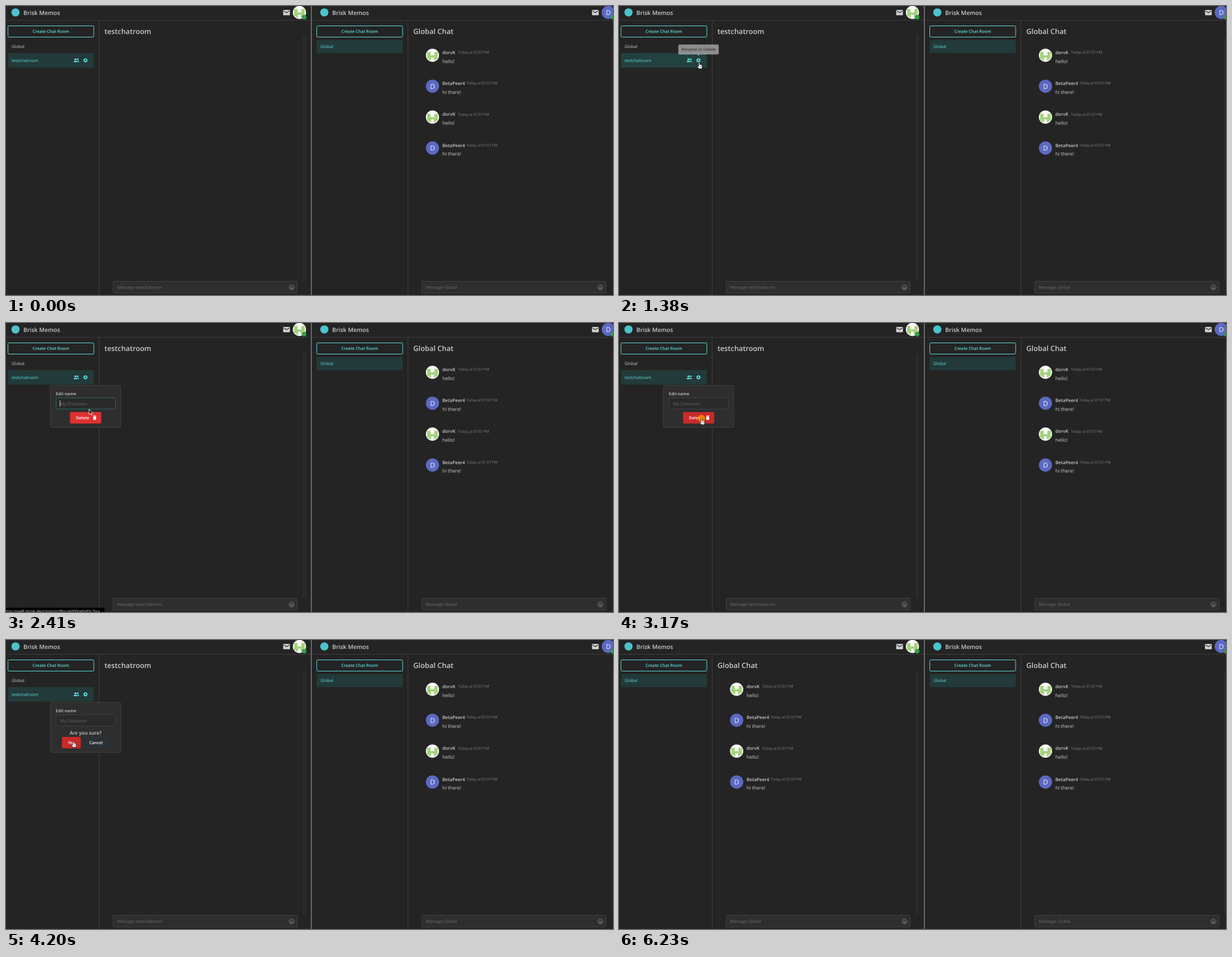
Animation, 1085 px wide and 516 px high, one loop 6630 ms. Source, as an HTML page:

```html
<!DOCTYPE html>
<html lang="en">
<head>
<meta charset="utf-8">
<title>Chat room deletion</title>
<style>
  html, body { margin: 0; width: 100%; height: 100%; overflow: hidden; background: #242424; }
  svg { display: block; width: 1085px; height: 516px; }
  text { font-family: "Open Sans", "Noto Sans", sans-serif; text-rendering: geometricPrecision; white-space: pre; }
  .b { font-weight: 600; }
</style>
</head>
<body>
<svg id="stage" viewBox="0 0 1085 516" xmlns="http://www.w3.org/2000/svg"></svg>
<script>
const LOOP = 6630, TICK = 69;
const TEAL = '#5fdedb', LIGHT = '#cbcbcb', RED = '#e03131', DARK_RED = '#c92a2a';

const text = (x, y, size, fill, str, bold, extra = '') =>
  `<text x="${x}" y="${y}" font-size="${size}" fill="${fill}" ${bold ? 'class="b"' : ''} ${extra}>${str}</text>`;
const rect = (x, y, w, h, fill, extra = '') =>
  `<rect x="${x}" y="${y}" width="${w}" height="${h}" fill="${fill}" ${extra}/>`;
const group = (id, body, extra = '') => `<g id="${id}" ${extra}>${body}</g>`;
const mid = 'text-anchor="middle"';

// Avatars
const blocks = (x, y) => `<g transform="translate(${x} ${y})">
  <circle r="11.8" fill="#f8f9f6"/>
  <path d="M-9.5 -6H-3.5V0H3.5V-6H9.5V6.5H6V9H2.5V4H-2.5V9H-6V6.5H-9.5Z" fill="#a4d27c"/></g>`;
const letter = (x, y) => `<circle cx="${x}" cy="${y}" r="11.8" fill="#5c69c1"/>` +
  text(x, y + 4.3, 12, '#f4f5ff', 'D', false, mid);

// Small icons
const mail = `<rect x="495.5" y="7" width="12" height="9.6" rx="1" fill="#d2d2d2"/>
  <path d="M496.6 8.7L501.5 12L506.4 8.7" fill="none" stroke="#242424" stroke-width="1.2"/>`;
const smile = `<g fill="none" stroke="#929292" stroke-width=".8"><circle cx="510.5" cy="502.5" r="4.5"/>
  <path d="M508 503.6Q510.5 506.6 513 503.6Z"/></g>
  <circle cx="509" cy="501.2" r=".7" fill="#929292"/><circle cx="512" cy="501.2" r=".7" fill="#929292"/>`;
const people = `<g fill="${TEAL}"><circle cx="124" cy="95.2" r="1.8"/><circle cx="128" cy="95.2" r="1.6"/>
  <path d="M121 100.2V99Q121 97.7 124 97.7T127 99V100.2Z"/><path d="M127.8 100.2V98.8L127.2 97.7Q130.4 97.7 130.4 99V100.2Z"/></g>`;
const gear = `<circle cx="142" cy="97" r="2.3" fill="none" stroke="${TEAL}" stroke-width="1.7"/>
  <circle cx="142" cy="97" r="3.3" fill="none" stroke="${TEAL}" stroke-width="1.1" stroke-dasharray="1.7 1.756"/>`;
const trash = `<path d="M155.5 165.6H157.4L158 165H159.2L159.8 165.6H161.6V166.6H155.5ZM156 167.2H161.1V172.2Q161.1 173 160.3 173H156.8Q156 173 156 172.2Z" fill="#fff"/>`;

const messages = () => [0, 1, 2, 3].map(i => {
  const y = 88 + i * 55.2, odd = i % 2;
  return (odd ? letter : blocks)(210.3, y) +
    text(228, y - 2, 8.15, LIGHT, odd ? 'BetaPeer4' : 'dorvK', true) +
    text(odd ? 271 : 256, y - 2.8, 6.55, '#858585', 'Today at 07:07 PM') +
    text(228, y + 13.6, 8.6, '#d0d0d0', odd ? 'hi there!' : 'hello!');
}).join('');

const globalView = () => rect(3.5, 60.7, 153.5, 23.3, '#223a39') +
  text(10, 75.2, 7.65, TEAL, 'Global') +
  text(176, 49.8, 12.85, LIGHT, 'Global Chat', true) +
  messages() + text(198.3, 504.5, 7.65, '#6d6d6d', 'Message Global');

const roomView = () => text(10, 75.2, 7.65, LIGHT, 'Global') +
  rect(3.5, 84, 153.5, 26, '#223a39', 'id="row"') +
  text(10, 100.2, 7.65, TEAL, 'testchatroom') + people + gear +
  text(176, 49.8, 12.75, LIGHT, 'testchatroom', true) +
  text(198.3, 504.5, 7.65, '#6d6d6d', 'Message testchatroom');

const panel = (dx, avatar, body) => `<g transform="translate(${dx} 0)">
  <path d="M-6 25.5H546M166.5 25.5V516" stroke="#3e3e3e" fill="none"/>
  <circle cx="17" cy="11.5" r="7.3" fill="#4cc3cc"/>
  ${text(31, 15.7, 10.5, LIGHT, 'Brisk Memos', true)}
  ${mail}${avatar(524.5, 11.5)}<circle cx="533" cy="20" r="4" fill="#2f9e44"/>
  ${rect(3.5, 35.5, 153.5, 20, 'none', `rx="2" stroke="${TEAL}"`)}
  ${text(80.2, 48.2, 7.5, TEAL, 'Create Chat Room', true, mid)}
  ${rect(530, 54, 6, 437, '#2b2b2b', 'rx="3"')}
  ${rect(191.5, 491.5, 329, 21, '#2e2e2e', 'rx="2" stroke="#424242"')}
  ${smile}${body}</g>`;

const popover = rect(79.5, 111.5, 125.5, 75, '#2e2e2e', 'id="box" rx="2" stroke="#414141"') +
  text(89, 129, 7.5, LIGHT, 'Edit name', true) +
  rect(89.5, 133.5, 106, 20, '#2a2a2a', 'id="field" rx="2"') +
  text(96.3, 146.5, 7.65, '#686868', 'My Chatroom') +
  rect(96, 138, 1, 11, '#c8c8c8', 'id="caret"') +
  group('ask', rect(114.5, 159, 55.8, 20.6, RED, 'id="del" rx="2"') +
    text(125, 172.1, 7.5, '#fff', 'Delete', true) + trash) +
  group('sure', text(142.2, 168.6, 8.75, LIGHT, 'Are you sure?', true, mid) +
    group('yes', rect(100, 173, 33.7, 20.6, RED, 'id="yesBg" rx="2"') +
      text(116.8, 185.9, 7.5, '#fff', 'Yes', true, mid)) +
    rect(137.7, 173, 46.3, 20.6, '#2c3138', 'rx="2"') +
    text(160.9, 185.9, 7.5, '#f2f2f2', 'Cancel', true, mid));

const tooltip = rect(104.7, 66, 75, 18.6, '#ececec', 'rx="2"') +
  '<path d="M139.5 84.5H144.5L142 87Z" fill="#ececec"/>' +
  text(142.2, 78.1, 7.63, '#242424', 'Rename or Delete', false, mid);

const status = rect(0, 508.5, 176, 8, '#000') +
  text(-4, 517.3, 6.6, '#e6e6e6', 'https://swift.dorvk.dev/chat/cm28hico6000be0pfi3c7lira');

const arrow = '<path d="M0 0V9.4L2.2 7.4L3.7 10.8L5.2 10.1L3.7 6.9H6.8Z" fill="#111" stroke="#f4f4f4" stroke-width=".9"/>';
const hand = `<path d="M-1 .8Q0 -.7 1 .8V4.2Q2 3.6 2.7 4.5Q3.6 4 4.3 4.9Q5.5 4.7 5.6 6V8.6Q5.5 10 4.6 11.6H-.4
  L-3 7.9Q-3.2 6.6 -1.9 6.9L-1 7.8Z" fill="#fff" stroke="#151515" stroke-width=".8"/>
  <path d="M1 6.4V9M2.6 6.4V9M4.1 6.4V9" stroke="#333" stroke-width=".5"/>`;

document.getElementById('stage').innerHTML = rect(0, 0, 1085, 516, '#242424') +
  panel(0, blocks, group('room', roomView()) + group('global', globalView())) +
  rect(545, 0, 540, 516, '#242424') +
  panel(552, letter, globalView()) +
  rect(545, 0, 1.4, 516, '#858585') +
  group('pop', popover) + group('tip', tooltip) + group('status', status) +
  '<circle id="ring" r="6.6" fill="#f08c00" opacity=".85"/>' +
  group('cursor', group('arrow', arrow) + group('hand', hand));

const el = {};
document.querySelectorAll('[id]').forEach(e => el[e.id] = e);

// Pointer path: time, x, y
const path = [
  [400, 606, 1], [540, 520, 38], [750, 365, 82], [1030, 213, 118], [1100, 190, 115],
  [1310, 144, 102], [1380, 143, 100], [1730, 144, 98], [1860, 146, 97], [1985, 148.5, 97],
  [2200, 150, 128], [2480, 148, 164], [2680, 147.5, 170], [3440, 147.5, 170],
  [3620, 131, 177], [3860, 120.5, 180], [4670, 119.5, 180], [5800, 119.5, 180],
  [5950, 220, 140], [6090, 420, 75], [6160, 572, 18], [6230, 572, 18]
];
const clicks = [1860, 3170, 4130];

const ramp = (t, a, b) => Math.min(1, Math.max(0, (t - a) / (b - a)));
const within = (t, a, b) => t >= a && t < b;
const show = (e, on) => e.style.display = on ? '' : 'none';

function pointer(t) {
  const i = Math.max(1, path.findIndex(p => p[0] > t));
  const [a, b] = [path[i - 1], path[i]];
  const k = ramp(t, a[0], b[0]);
  return [a[1] + (b[1] - a[1]) * k, a[2] + (b[2] - a[2]) * k];
}

function draw(t) {
  const left = t >= 4670, sure = t >= 3240;
  show(el.room, !left);
  show(el.global, left);
  el.row.setAttribute('fill', within(t, 1170, 2060) ? '#22413f' : '#223a39');

  const tipIn = ramp(t, 1305, 1450);
  el.tip.setAttribute('opacity', tipIn * (1 - ramp(t, 2060, 2200)));
  el.tip.setAttribute('transform',
    `translate(142 ${87 + 4 * (1 - tipIn)}) scale(${0.92 + 0.08 * tipIn}) translate(-142 -87)`);

  const open = ramp(t, 1925, 2060);
  show(el.pop, within(t, 1925, 4670));
  el.pop.setAttribute('opacity', Math.min(1, open * 2));
  el.pop.setAttribute('transform', `translate(142 111) scale(${0.79 + 0.21 * open}) translate(-142 -111)`);
  el.box.setAttribute('height', sure ? 89 : 75);
  el.field.setAttribute('stroke', t < 3170 ? '#2c6964' : '#414141');
  show(el.caret, t < 2480 || within(t, 3020, 3170));
  show(el.ask, !sure);
  show(el.sure, sure);
  el.del.setAttribute('fill', t >= 2480 ? DARK_RED : RED);
  el.yesBg.setAttribute('fill', t >= 3720 ? DARK_RED : RED);
  el.yes.setAttribute('transform', `translate(0 ${within(t, 4130, 4200) ? 0.6 : 0})`);

  const bar = t < 3000 ? ramp(t, 1450, 1600) * (1 - ramp(t, 2480, 2680))
    : t >= 3240 ? 1 - ramp(t, 3580, 3720) : 0;
  el.status.setAttribute('opacity', bar);

  const [x, y] = pointer(t < 400 ? 400 : 400 + Math.floor((t - 400) / TICK) * TICK);
  const grip = within(t, 1200, 2060) || within(t, 2450, 3240) || within(t, 3580, 4670);
  show(el.cursor, within(t, 400, 6230));
  show(el.hand, grip);
  show(el.arrow, !grip);
  el.cursor.setAttribute('transform', `translate(${x} ${y})`);
  show(el.ring, clicks.some(c => within(t, c, c + 70)));
  el.ring.setAttribute('cx', x);
  el.ring.setAttribute('cy', y + 0.5);
}

function frame() {
  draw(performance.now() % LOOP);
  requestAnimationFrame(frame);
}
frame();
</script>
</body>
</html>
```
